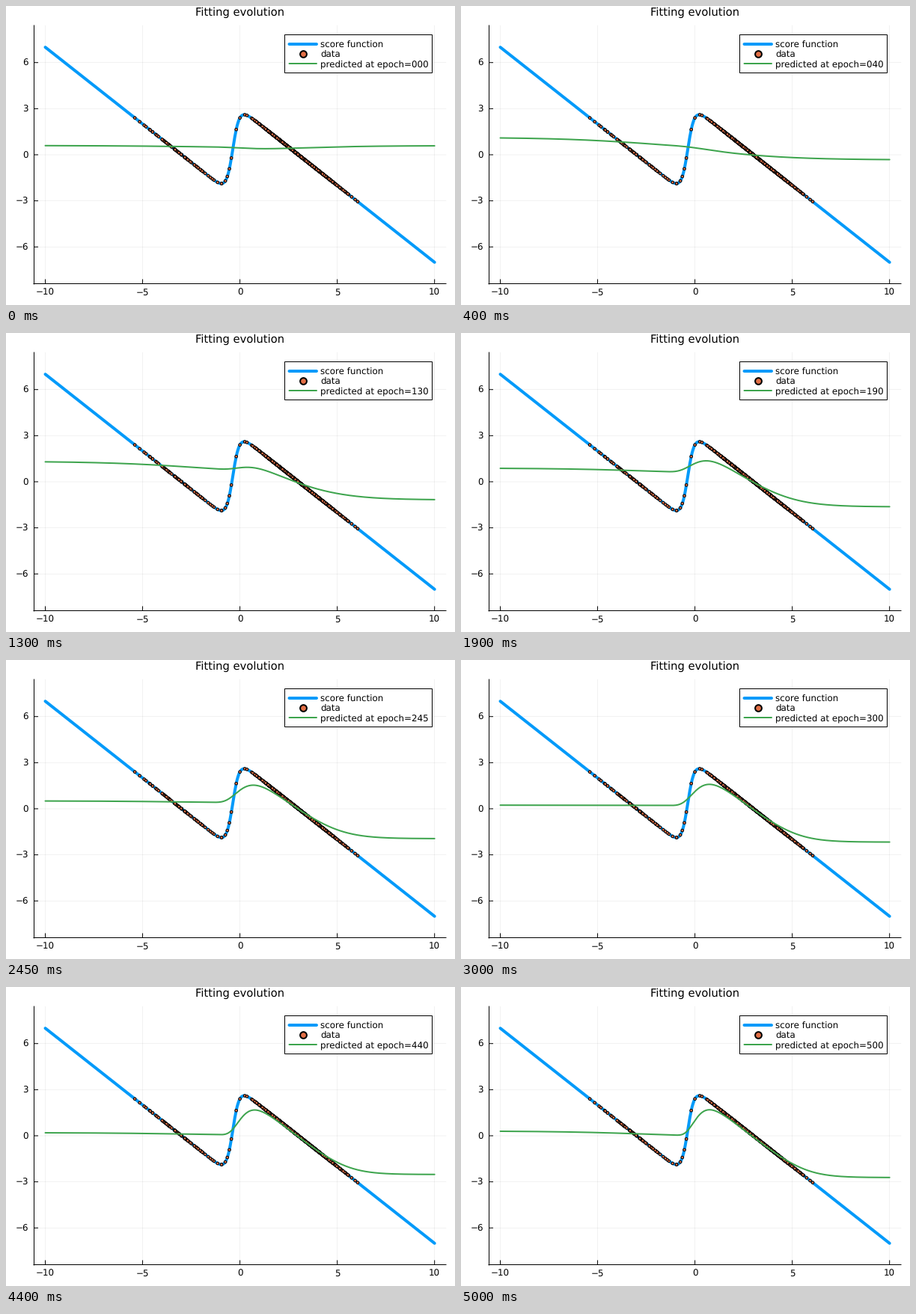
Write a matplotlib script that moves like this. It is 600 px wide and 400 px high and loops after 5050 ms.

```python
import numpy as np
import matplotlib.pyplot as plt
from matplotlib.animation import FuncAnimation
from matplotlib.patches import Rectangle

W, H, DPI = 600, 400, 100
PT = 72 / DPI                      # points per pixel
FRAMES, STEP = 101, 50
BLUE, ORANGE, GREEN = "#009AFA", "#E26F46", "#3DA44D"

plt.rcParams.update({"font.family": "DejaVu Sans", "path.snap": False,
                     "text.hinting": "no_hinting"})
fig = plt.figure(figsize=(W / DPI, H / DPI), dpi=DPI, facecolor="white")
ax = fig.add_axes([0, 0, 1, 1])
ax.set(xlim=(0, W), ylim=(H, 0))
ax.axis("off")


def px(x):
    return 312.6 + 26.01 * np.asarray(x)


def py(y):
    return 199.0 - 20.55 * np.asarray(y)


def score(x):
    """Score of 0.1 N(-3, 1) + 0.9 N(3, 1)."""
    return 3 * np.tanh(3 * x + 0.5 * np.log(9)) - x


def line(x, y, color, width, z, **kw):
    return ax.plot(x, y, color=color, lw=width * PT, zorder=z, **kw)[0]


def text(x, y, s, size, ha="left"):
    return ax.text(x, y, s, fontsize=size * PT, ha=ha, va="baseline", zorder=9)


def dots(x, y, size, edge, z):
    ax.scatter(x, y, s=np.full(len(x), (size * PT) ** 2), c=ORANGE,
               edgecolors="black", linewidths=edge * PT, zorder=z)


# axes
for v in range(-10, 11, 5):
    x = px(v)
    line([x, x], [26, 371], "black", 0.5, 1, alpha=0.1)
    line([x, x], [371.5, 366], "black", 1, 2)
    text(x, 387, f"{v}".replace("-", "\u2212"), 11.9, "center")
for v in range(-6, 7, 3):
    y = py(v)
    line([37, 588], [y, y], "black", 0.5, 1, alpha=0.1)
    line([37.5, 42.5], [y, y], "black", 1, 2)
    text(30, y + 4.4, f"{v}".replace("-", "\u2212"), 11.9, "right")
line([37.5, 37.5], [26, 372], "black", 1, 2)
line([37, 588], [371.5, 371.5], "black", 1, 2)
text(312.6, 13, "Fitting evolution", 14.7, "center")

# score function and samples
grid = np.linspace(-10, 10, 500)
line(px(grid), py(score(grid)), BLUE, 4, 3, solid_capstyle="round")

rng = np.random.default_rng(4)
left, right = rng.normal(-3, 1, 75), rng.normal(3, 1, 890)
data = np.concatenate([
    [-5.4, -5.15, -4.92], left[(left > -4.9) & (left < -0.9)],
    np.linspace(-0.75, -0.44, 4), [-0.19, 0, 0.25, 0.36],
    right[(right > 0.6) & (right < 5.6)], [5.74, 5.92, 6.05]])
dots(px(data), py(score(data)), 3.6, 1, 4)

# fitted curve: key values over training, the rest follows from the epoch
EPOCHS = np.array([0, 40, 130, 190, 300, 380, 500])
LEFT_END = np.array([.60, 1.13, 1.33, .89, .235, .14, .31])
LEFT_DROP = np.array([.16, .90, .85, .42, .04, .05, .45])
RIGHT_END = np.array([.59, -.33, -1.18, -1.63, -2.17, -2.34, -2.72])
BEND = np.array([4.6, 4.6, 4.05, 4.62, 5.1, 5.25, 5.6])


def ease(t, values):
    """Smooth cubic path through the key values."""
    m = np.gradient(values, EPOCHS)
    i = min(np.searchsorted(EPOCHS, t, side="right"), len(EPOCHS) - 1) - 1
    h = EPOCHS[i + 1] - EPOCHS[i]
    u = (t - EPOCHS[i]) / h
    return (values[i] * (1 + 2 * u) * (1 - u) ** 2
            + values[i + 1] * u * u * (3 - 2 * u)
            + h * u * (1 - u) * (m[i] * (1 - u) - m[i + 1] * u))


def predict(x, epoch):
    """Gentle left branch, switching to a falling line that levels off."""
    slope = 1.065 * (1 - np.exp(-(epoch / 120) ** 1.5)) - 0.065
    soft = 2 - 1.2 * slope ** 2
    low = ease(epoch, LEFT_END) - ease(epoch, LEFT_DROP) / (1 + np.exp(-(x + 2) / 2.5))
    fall = ease(epoch, RIGHT_END) + slope * soft * np.logaddexp(
        0, (ease(epoch, BEND) - x) / soft)
    steep = 0.95 + epoch / 450
    start = 0.21 - 0.18 * np.tanh((epoch - 155) / 25)
    gate = np.exp(-np.exp(-steep * (x - start)))
    return low + (fall - low) * gate


fit = line(px(grid), py(grid), GREEN, 2, 5, solid_capstyle="round")

# legend
ax.add_patch(Rectangle((372.5, 38.5), 197, 51, fc="white", ec="black",
                       lw=1 * PT, zorder=7))
line([378.5, 415], [51, 51], BLUE, 4, 8, solid_capstyle="round")
dots([396.6], [64], 8.8, 2, 8)
line([378.5, 415], [77, 77], GREEN, 2, 8, solid_capstyle="round")
text(420, 55, "score function", 11.9)
text(420, 68, "data", 11.9)
label = text(420, 81, "", 11.9)


def draw(k):
    epoch = 5 * k
    fit.set_ydata(py(predict(grid, epoch)))
    label.set_text(f"predicted at epoch={epoch:03d}")
    return fit, label


anim = FuncAnimation(fig, draw, frames=FRAMES, interval=STEP, repeat=True,
                     repeat_delay=0, blit=False)
plt.show()
```
